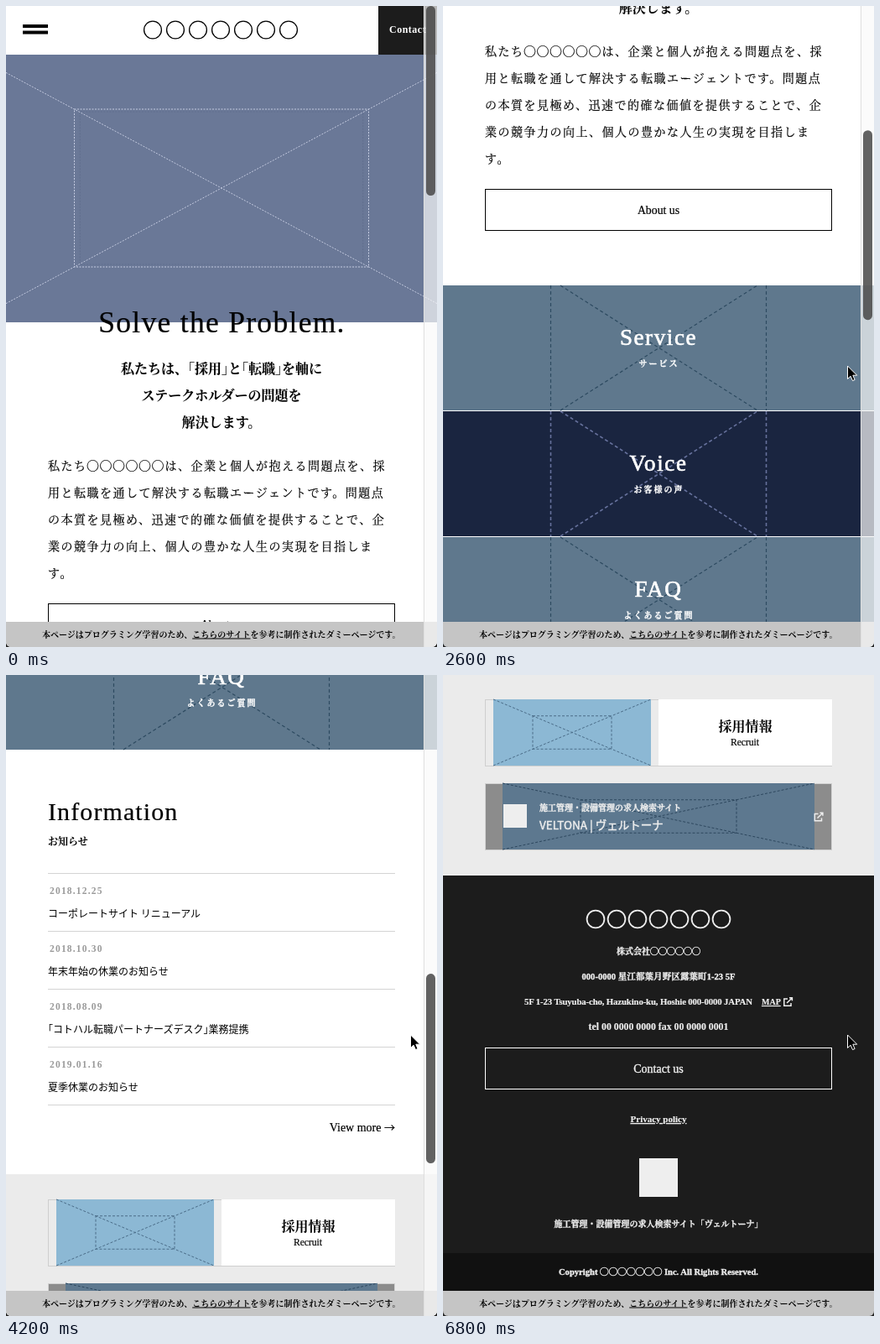
Animation of 514 by 764 pixels, one loop 7000 ms. Source, as an HTML page:

```html
<!DOCTYPE html>
<html lang="ja">
<head>
<meta charset="utf-8">
<style>
  html, body { margin: 0; width: 100%; height: 100%; overflow: hidden; background: #222; }
  svg { display: block; width: 514px; height: 764px; background: #fff; border-radius: 0 0 6px 6px; }
  text { font-family: "Liberation Serif", "Noto Serif CJK JP", "Noto Sans CJK JP", "Noto Sans CJK", serif; white-space: pre; }
  .sans { font-family: "Noto Sans CJK JP", "Noto Sans CJK", sans-serif; }
  .u { text-decoration: underline; }
</style>
</head>
<body>
<svg id="stage" viewBox="0 0 514 764"></svg>
<script>
const WHITE = '#eee';
const rect = (x, y, w, h, fill, more = '') =>
  `<rect x="${x}" y="${y}" width="${w}" height="${h}" fill="${fill}" ${more}/>`;
const box = (x, y, w, h, color) => rect(x + .5, y + .5, w - 1, h - 1, 'none', `stroke="${color}"`);
const line = (d, color, width, dash, more = '') =>
  `<path d="${d}" fill="none" stroke="${color}" stroke-width="${width}" stroke-dasharray="${dash}" ${more}/>`;
// pen thickens the letters by an outline in their own colour
const text = (x, y, size, str, { anchor = 'middle', fill = '#000', weight = 400, ls = 0, pen = 0, more = '' } = {}) =>
  `<text x="${x}" y="${y}" font-size="${size}" text-anchor="${anchor}" fill="${fill}" stroke="${fill}" stroke-width="${pen}" font-weight="${weight}" letter-spacing="${ls}" ${more}>${str}</text>`;
const rings = (x, y, step, width, color) => Array.from({ length: 7 }, (_, i) =>
  `<circle cx="${x + i * step}" cy="${y}" r="10.4" fill="none" stroke="${color}" stroke-width="${width}"/>`).join('');
const linkIcon = (x, y) =>
  `<path transform="translate(${x} ${y})" d="M5 2H.8V10.2H9V7M4 7L10.2 1M7 .8H10.4V4.2" fill="none" stroke="${WHITE}" stroke-width="1.5"/>`;

// Centred frame of half size (hw, hh) with diagonals running to the hero's edges
const frame = (hw, hh) => {
  const r = 257 * hh / hw;
  return `M${257 - hw} ${217 - hh}h${2 * hw}v${2 * hh}h${-2 * hw}zM0 ${217 - r}L514 ${217 + r}M0 ${217 + r}L514 ${217 - r}`;
};
// Crossed picture with an inner frame of half its size
const crossed = (x, y, w, h, fill, color) => rect(x, y, w, h, fill) +
  line(`M${x} ${y}l${w} ${h}M${x} ${y + h}l${w} ${-h}M${x + w / 4} ${y + h / 4}h${w / 2}v${h / 2}h${-w / 2}z`, color, 1, '3 2');

function hero() {
  return rect(0, 58, 514, 319, '#6a7897', 'id="hero"') +
    '<g id="next">' + line(frame(168.7, 91), 'currentColor', 1, '2 1.5') + '</g>' +
    line(frame(175.5, 94), '#c6cde2', 1, '2 1.5', 'id="prev"');
}

function intro() {
  const lead = ['私たちは、｢採用｣と｢転職｣を軸に', 'ステークホルダーの問題を', '解決します。'];
  const body = [
    '私たち◯◯◯◯◯◯は、企業と個人が抱える問題点を、採',
    '用と転職を通して解決する転職エージェントです。問題点',
    'の本質を見極め、迅速で的確な価値を提供することで、企',
    '業の競争力の向上、個人の豊かな人生の実現を目指しま',
    'す。'];
  return rect(20, 22, 30, 4, '#000') + rect(20, 29.5, 30, 4, '#000') +
    rings(175, 28.5, 27, 1.3, '#000') +
    rect(444, 0, 70, 58, '#1c1c1c') +
    text(457, 32, 12, 'Contact', { anchor: 'start', fill: '#fff', weight: 700, ls: .5 }) +
    hero() +
    text(257.5, 389, 35.5, 'Solve the Problem.', { ls: 1.3, pen: .2 }) +
    lead.map((s, i) => text(257, 438 + i * 32, 16, s, { weight: 600, pen: .1 })).join('') +
    body.map((s, i) => text(50, 552.5 + i * 32, 14, s, { anchor: 'start', weight: 500, ls: 1.5, pen: .2 })).join('') +
    box(50, 712, 414, 50, '#000') + text(257, 741.5, 13.8, 'About us', { pen: .2 });
}

function panels() {
  const light = ['#5f788d', '#2d4a60', 1.2], dark = ['#1a2540', '#66719c', 1.6];
  return [['Service', 'サービス', light], ['Voice', 'お客様の声', dark], ['FAQ', 'よくあるご質問', light]]
    .map(([name, sub, [fill, color, width]], i) => {
      const y = 827 + i * 150;
      return rect(0, y, 514, 149, fill) +
        line(`M128.5 ${y}v149M385.5 ${y}v149M140 ${y}l235 149M140 ${y + 149}l235 -149`, color, width, '4 3') +
        text(257, y + 71, 27, name, { fill: '#fff', ls: 1.6, pen: .7 }) +
        text(257.5, y + 97, 10, sub, { fill: '#fff', weight: 700, ls: 2, pen: .3 });
    }).join('');
}

function news() {
  const items = [
    ['2018.12.25', 'コーポレートサイト リニューアル'],
    ['2018.10.30', '年末年始の休業のお知らせ'],
    ['2018.08.09', '｢コトハル転職パートナーズデスク｣業務提携'],
    ['2019.01.16', '夏季休業のお知らせ']];
  const left = { anchor: 'start' };
  return text(50, 1360, 30, 'Information', { ...left, ls: 1.1, pen: .2 }) +
    text(50, 1390, 12, 'お知らせ', { ...left, weight: 600 }) +
    [0, 1, 2, 3, 4].map(i => rect(50, 1423 + i * 69, 414, 1, '#d4d4d4')).join('') +
    items.map(([date, title], i) =>
      text(52, 1448 + i * 69, 11.5, date, { ...left, fill: '#999', weight: 700, ls: 1.2 }) +
      text(50, 1475.5 + i * 69, 12, title, { ...left, more: 'class="sans"' })).join('') +
    text(464, 1731, 14, 'View more <tspan class="sans" font-size="13">→</tspan>', { anchor: 'end', pen: .2 });
}

function cards() {
  const left = { anchor: 'start', fill: WHITE };
  return rect(0, 1782, 514, 240, '#ebebeb') +
    box(50, 1812, 414, 80, '#cfcfcf') + rect(257, 1812, 207, 79, '#fff') +
    crossed(60, 1812, 188, 79, '#8cb8d4', '#4b6d89') +
    text(360.5, 1850, 16, '採用情報', { weight: 600 }) + text(360, 1867, 11.6, 'Recruit', { pen: .2 }) +
    rect(50, 1912, 414, 80, '#d0d0d0') + rect(51, 1913, 412, 78, '#8c8c8c') +
    crossed(71, 1912, 372, 79, '#5d788f', '#2d475e') +
    rect(72, 1937, 28, 28, WHITE) +
    text(115, 1945, 10, '施工管理・設備管理の求人検索サイト', { ...left, weight: 700, pen: .35 }) +
    text(115, 1967, 13.5, 'VELTONA | ヴェルトーナ', { ...left, pen: .45, more: 'class="sans"' }) +
    linkIcon(442.5, 1946.5);
}

function footer() {
  const o = { fill: WHITE, weight: 700, pen: .2 }, cjk = { ...o, pen: .35 };
  return rect(0, 2022, 514, 450, '#1c1c1c') + rect(0, 2472, 514, 75, '#111') +
    rings(182, 2074, 25, 1.8, WHITE) +
    text(257, 2116, 10, '株式会社◯◯◯◯◯◯', cjk) +
    text(257, 2146, 10.6, '000-0000 星江都葉月野区露葉町1-23 5F', cjk) +
    text(97, 2176, 10.8, '5F 1-23 Tsuyuba-cho, Hazukino-ku, Hoshie 000-0000 JAPAN', { ...o, anchor: 'start', ls: -.15 }) +
    text(380, 2176, 10, 'MAP', { ...o, anchor: 'start', more: 'class="u"' }) +
    linkIcon(406, 2167) +
    text(257, 2206, 11.8, 'tel 00 0000 0000 fax 00 0000 0001', o) +
    box(50, 2227, 414, 50, '#fff') +
    text(257, 2256.5, 14, 'Contact us', { fill: WHITE, pen: .4 }) +
    text(257, 2316, 11, 'Privacy policy', { ...o, more: 'class="u"' }) +
    rect(234, 2359, 46, 46, WHITE) +
    text(257, 2441, 10, '施工管理・設備管理の求人検索サイト「ヴェルトーナ」', cjk) +
    text(257, 2498, 10.6, 'Copyright ◯◯◯◯◯◯◯ Inc. All Rights Reserved.', cjk);
}

const $ = id => document.getElementById(id);
$('stage').innerHTML =
  `<g id="page">${intro()}${panels()}${news()}${cards()}${footer()}</g>` +
  rect(0, 734, 514, 30, '#c5c5c5') +
  text(43, 752.5, 10, '本ページはプログラミング学習のため、<tspan class="u">こちらのサイト</tspan>を参考に制作されたダミーページです。', { anchor: 'start', weight: 700 }) +
  '<g id="bar">' + rect(498, 0, 16, 764, '#fafafa', 'opacity=".7"') + rect(498, 0, 1, 764, '#dedede') +
  rect(501, 0, 11, 226, '#484848', 'id="thumb" rx="5.5" opacity=".85"') + '</g>' +
  '<path id="cursor" d="M0 0V15.5L3.6 12.2L6 17.6L8.6 16.5L6.3 11.2H11.2Z" fill="#000" stroke="#fff"/>';

// Time and page offset of the scroll gestures, with rests between flicks
const SCROLL = [[800, 0], [900, 8], [1300, 100], [1700, 212], [2000, 350], [2400, 486], [2500, 486],
  [2600, 494], [3000, 665], [3500, 898], [4000, 1130], [4100, 1130], [4500, 1358], [4700, 1358],
  [4800, 1374], [5100, 1500], [5300, 1500], [5600, 1640], [5700, 1640], [5900, 1657], [6300, 1783]];
const clamp = v => Math.min(1, Math.max(0, v));
const mix = (a, b, k) => `rgb(${a.map((v, i) => Math.round(v + (b[i] - v) * k))})`;

function offset(t) {
  const i = SCROLL.findIndex(p => p[0] > t);
  if (i === 0) return 0;
  if (i < 0) return 1783;
  const [t0, y0] = SCROLL[i - 1], [t1, y1] = SCROLL[i];
  return Math.round(y0 + (y1 - y0) * (t - t0) / (t1 - t0));
}

function draw() {
  // The picture advances ten times a second
  const t = Math.floor(performance.now() % 7000 / 100) * 100;
  const y = offset(t), fade = clamp(t / 1000), enter = 1 - clamp((t - 100) / 600);
  $('page').setAttribute('transform', `translate(0 ${-y})`);
  $('hero').setAttribute('fill', mix([106, 120, 151], [38, 53, 95], fade));
  $('next').setAttribute('color', mix([96, 110, 142], [146, 156, 192], fade));
  $('prev').setAttribute('opacity', 1 - fade);
  $('thumb').setAttribute('y', y * .3);
  $('bar').setAttribute('opacity', clamp((6800 - t) / 400));
  $('cursor').setAttribute('transform', `translate(${482.5 + 18 * enter} ${429 + 306 * enter * enter})`);
  $('cursor').setAttribute('visibility', t < 100 ? 'hidden' : 'visible');
  requestAnimationFrame(draw);
}
draw();
</script>
</body>
</html>
```
